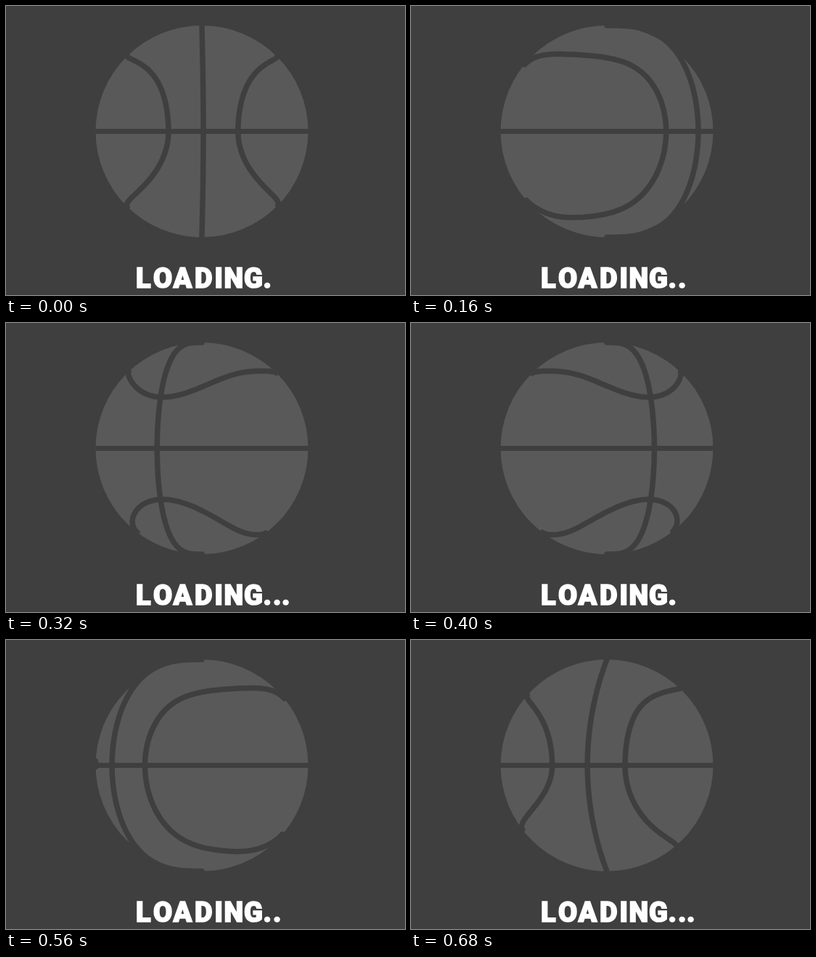
An HTML page for the animation above (0.72 s loop, 550 px wide and 400 px high).

```html
<!DOCTYPE html>
<html lang="en">
<head>
<meta charset="utf-8">
<title>Loading</title>
<style>
  html, body { margin: 0; width: 100%; height: 100%; overflow: hidden; background: #3f3f3f; }
  svg { display: block; width: 550px; height: 400px; }
  text { font: 900 38px Roboto, sans-serif; fill: #fff; stroke: #fff; stroke-width: 1.6; }
</style>
</head>
<body>
<svg viewBox="0 0 550 400">
  <rect width="550" height="400" fill="#3f3f3f"/>
  <circle cx="270" cy="173.5" r="146.5" fill="#595959"/>
  <g fill="none" stroke="#3f3f3f" stroke-width="7.5" stroke-linejoin="round" stroke-linecap="round">
    <path d="M120 173.5H420" stroke-width="7"/>
    <path id="seams"/>
  </g>
  <text id="label" y="390.4" x="179 203 230.5 260 287.5 300.5 328 354.5 368 380"></text>
</svg>
<script>
const CX = 270, CY = 173.5, R = 146.5, STEP = 40, STEPS = 18;
const seams = document.getElementById('seams');
const label = document.getElementById('label');
const sin = deg => Math.sin(deg * Math.PI / 180);
const cos = deg => Math.cos(deg * Math.PI / 180);

// Half a side seam: it climbs steeply to its peak latitude, then dips at the back.
// The climb gets gentler as that side of the ball turns away.
const UPPER = { peak: 48, dip: 19, width: 38, steep: .27, mid: .21, slope: .2 };
const LOWER = { peak: 57, dip: 28, width: 45, steep: .25, mid: .13, slope: .14 };

// Path through [x, y, visible] points, broken where hidden.
function trace(pts) {
  let d = '', pen = false;
  for (const [x, y, visible] of pts) {
    if (visible) d += (pen ? 'L' : 'M') + x.toFixed(1) + ' ' + y.toFixed(1);
    pen = visible;
  }
  return d;
}

function sideSeam(turn, side) {
  const s = sin(side * turn), facing = cos(turn) > 0;
  const near = 19 + (s > 0 ? 6 * s + 9 * s * s : -7.5 * s);
  const reach = Math.sqrt(180 - near);
  const pts = [];
  for (let i = -60; i <= 60; i++) {
    const half = i > 0 ? UPPER : LOWER;
    const r = Math.abs(i) / 60 * reach, p = near + r * r;
    const climb = facing ? Math.min(half.steep, half.mid - half.slope * s) : half.steep;
    const dip = half.dip * Math.exp(-(((180 - p) / half.width) ** 2));
    const lat = Math.sign(i) * (half.peak * Math.tanh(climb * r) - dip);
    const lon = side * p + turn;
    pts.push([CX + R * cos(lat) * sin(lon), CY - R * sin(lat), cos(lon) > 0]);
  }
  return trace(pts);
}

function meridian(turn) {
  const facing = cos(turn) >= 0;
  const s = facing ? sin(turn) : -sin(turn);
  const bend = facing ? 2.3 - 1.9 * Math.abs(s) : .6;
  const pts = [];
  for (let lat = -90; lat <= 90; lat += 2) {
    pts.push([CX + R * s * cos(lat) ** bend, CY - R * sin(lat), true]);
  }
  return trace(pts);
}

// One full turn per loop, slow at the front and fast at the back.
function turnAt(i) {
  const a = 360 * i / STEPS;
  return .8 + a - 21 * sin(a) - 2.3 * sin(2 * a);
}

function draw(ms) {
  const i = Math.floor(ms / STEP) % STEPS;
  const turn = turnAt(i);
  seams.setAttribute('d', meridian(turn) + sideSeam(turn, -1) + sideSeam(turn, 1));
  label.textContent = 'LOADING' + '.'.repeat(1 + Math.floor(i / 3) % 3);
}

const start = performance.now();
function tick() {
  draw(performance.now() - start);
  requestAnimationFrame(tick);
}
tick();
</script>
</body>
</html>
```
